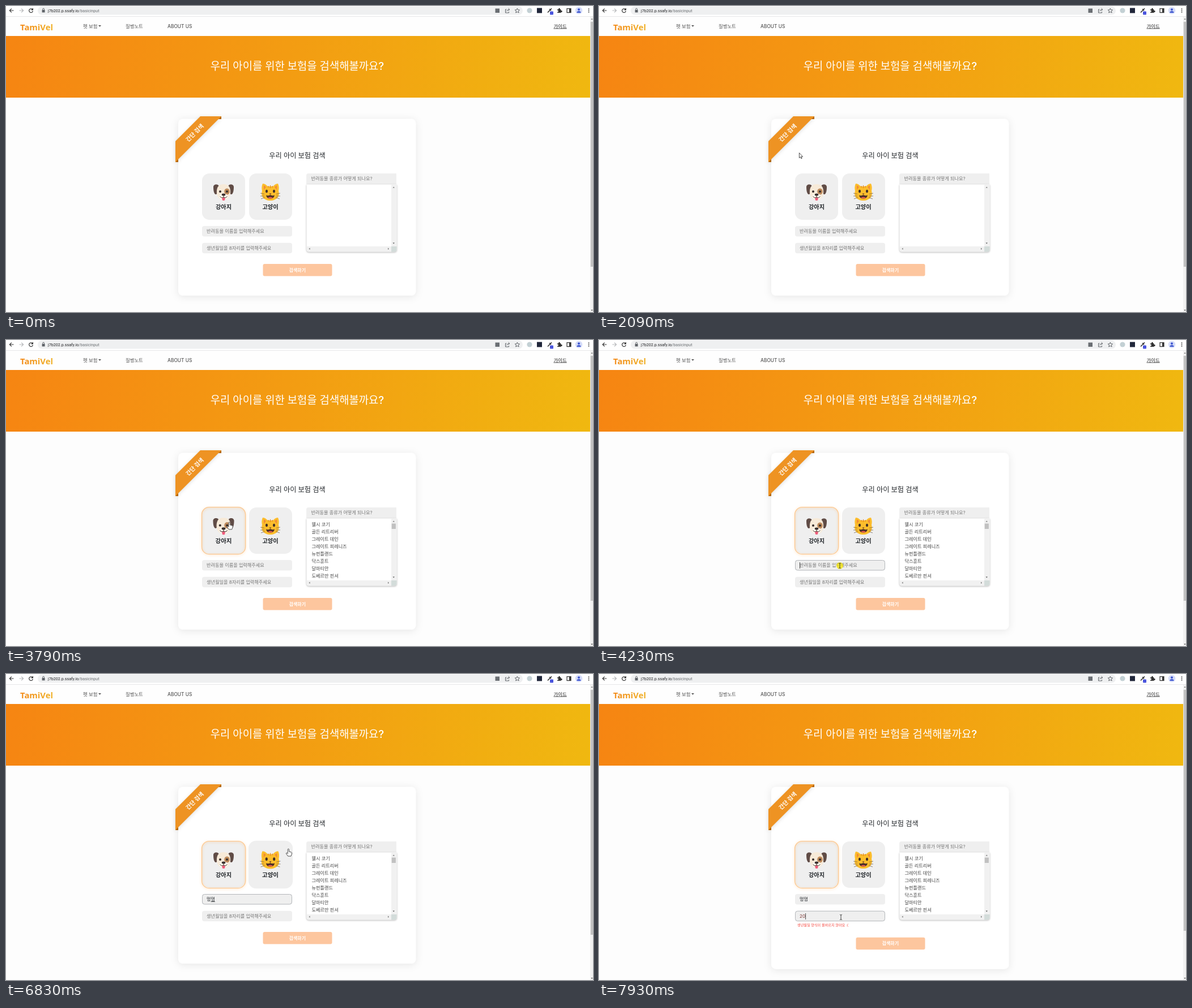
An HTML page that plays this animation: 1036 px wide and 541 px high, repeating every 8 s.

```html
<!DOCTYPE html>
<html lang="ko">
<head>
<meta charset="utf-8">
<title>보험 검색</title>
<style>
html, body { margin: 0; width: 100%; height: 100%; overflow: hidden; background: #fdfdfd; }
svg { display: block; width: 100vw; height: 100vh; }
text { font: 8.15px Inter, "Noto Sans CJK KR", "Noto Sans CJK", sans-serif; fill: #212529; white-space: pre; }
.mid { text-anchor: middle; }
.url { font: 7.2px Roboto, sans-serif; fill: #202124; }
.nav { font-size: 8.4px; font-weight: 500; fill: #555; }
.logo { font: 700 14.8px "Noto Sans", sans-serif; fill: url(#logoFill); }
.hero { font-size: 18.8px; font-weight: 500; fill: #fff; }
.title { font-size: 12.2px; font-weight: 500; }
.label { font-size: 10.2px; font-weight: 700; }
.ribbon { font-size: 10px; font-weight: 700; fill: #fff; }
.hint { fill: #757575; }
.button { font-size: 8px; font-weight: 700; fill: #fff; }
.error { font-size: 6.15px; fill: #f5453d; }
.panel { fill: #fff; filter: drop-shadow(0 2px 7px rgba(0, 0, 0, .09)); }
.listbox { fill: #fff; filter: drop-shadow(0 1.5px 1.5px rgba(0, 0, 0, .32)); }
.field, .pet { fill: #efefef; }
.ring { fill: none; stroke: #fdc88f; stroke-width: 1.3; filter: drop-shadow(0 1px 2px rgba(253, 175, 90, .55)); }
.focus { fill: none; stroke: #b4b7bb; }
.icon { fill: none; stroke: #5f6368; stroke-width: 1; }
.scale { transform-box: fill-box; transform-origin: center; }
</style>
</head>
<body>
<svg viewBox="0 0 1036 541" preserveAspectRatio="none">
  <defs>
    <linearGradient id="heroFill" gradientUnits="userSpaceOnUse" x1="0" y1="53" x2="1031" y2="162">
      <stop offset="0" stop-color="#f68512"/><stop offset=".5" stop-color="#f39d12"/><stop offset="1" stop-color="#f0b810"/>
    </linearGradient>
    <linearGradient id="logoFill"><stop stop-color="#f38a17"/><stop offset="1" stop-color="#f0b22a"/></linearGradient>
  </defs>
  <rect width="1036" height="541" fill="#fdfdfd"/>

  <!-- browser bar -->
  <rect width="1036" height="18" fill="#fff"/>
  <rect x="56" y="1" width="856" height="14.5" rx="7.2" fill="#eff0f1"/>
  <path d="M0 18.5H1036" stroke="#e6e7e8"/>
  <path class="icon" style="stroke:#333;stroke-width:1.2" d="M13.5 8H6.5M9.8 4.6L6.4 8l3.4 3.4"/>
  <path class="icon" style="stroke:#b5b7ba;stroke-width:1.2" d="M23.5 8h7M27.2 4.6L30.6 8l-3.4 3.4"/>
  <path class="icon" style="stroke:#333;stroke-width:1.2" d="M46.7 6A3.4 3.4 0 1 0 47.4 9M47.4 4v2.8h-2.8"/>
  <path d="M63.6 7h5v4.4h-5z" fill="#5f6368"/><path class="icon" d="M64.7 7V5.6a1.4 1.4 0 0 1 2.8 0V7"/>
  <text class="url" x="74" y="10.8">j7b202.p.ssafy.io<tspan fill="#6b6f73">/basicinput</tspan></text>
  <rect x="863.5" y="4.5" width="7.5" height="7.5" fill="#6a6e73"/>
  <path class="icon" d="M883.5 6H881.5V12H887.5V10M883.5 9.5q.5-3 5-3.2M886.5 4l2.3 2.2-2.3 2.2"/>
  <path class="icon" stroke-width=".9" d="M902.4 4l1.2 2.8 3 .2-2.3 2 .8 3-2.7-1.6-2.7 1.6.8-3-2.3-2 3-.2z"/>
  <circle cx="924" cy="8" r="4.6" fill="#c3d0d4"/>
  <rect x="937" y="3.5" width="9" height="9" fill="#20263a"/>
  <path d="M956 11.5l4.5-4.8M959 5.3l3 3M961 6.3l2-2" stroke="#333" stroke-width="1.6"/>
  <rect x="960" y="9.5" width="6" height="6" rx="1" fill="#4a55dd"/>
  <path d="M973 6h2.2a1.5 1.5 0 1 1 2.6 0h1.7v2.2a1.5 1.5 0 1 1 0 2.6V12H973v-1.6a1.4 1.4 0 1 0 0-2.6z" fill="#333"/>
  <rect x="990" y="4.6" width="7" height="7" fill="none" stroke="#333" stroke-width="1.2"/><path d="M994 4.6h3v7h-3z" fill="#333"/>
  <circle cx="1011" cy="8" r="6.3" fill="#d5dcf8"/><circle cx="1011" cy="6.2" r="2" fill="#3f57cf"/><path d="M1007.4 12q0-3 3.6-3t3.6 3z" fill="#3f57cf"/>
  <path d="M1028.500 4.500v7" stroke="#333" stroke-width="1.7" stroke-dasharray="1.6 1.1"/>

  <!-- navigation and hero -->
  <rect y="19" width="1031" height="34" fill="#fefefe"/>
  <text class="logo" x="25" y="42.700">TamiVel</text>
  <text class="nav" x="136" y="38.500">펫 보험</text><path d="M163 34h5l-2.500 2.800z" fill="#555"/>
  <text class="nav" x="211" y="38.500">질병노트</text>
  <text class="nav" x="285" y="38.500">ABOUT US</text>
  <text class="nav" x="966.500" y="38.500" style="fill:#222;text-decoration:underline">가이드</text>
  <rect y="53" width="1031" height="109" fill="url(#heroFill)"/>
  <text class="hero mid" x="514" y="113.300">우리 아이를 위한 보험을 검색해볼까요?</text>
  <rect x="1031" y="19" width="5" height="522" fill="#f1f1f1"/>
  <path d="M1032.300 24l1.700-2 1.700 2z" fill="#777"/><path d="M1032.300 537l1.700 2 1.700-2z" fill="#555"/>
  <rect id="thumb" x="1031.800" y="28" width="4.200" height="433" fill="#c1c1c1"/>

  <!-- search panel -->
  <rect id="panel" class="panel" x="304" y="199.500" width="419.500" height="312.500" rx="8"/>
  <path d="M375 195h5v5h-5zM299 271h5v5h-5z" fill="#b9690f"/>
  <path d="M343 195h37L299 276V239z" fill="#ee9323" style="filter:drop-shadow(0 2px 3px rgba(0,0,0,.12))"/>
  <text class="ribbon mid" transform="translate(333 224) rotate(-45)" y="3.700">간단 검색</text>
  <text class="title mid" x="514" y="268.600">우리 아이 보험 검색</text>

  <g id="dog" class="scale">
    <rect class="pet" x="346" y="296" width="76" height="82" rx="13"/>
    <path d="M375 317c-4-3-9-1-9 3 0 6 1 12 4 13 4 0 5-8 7-12zM393 317c4-3 9-1 9 3 0 6-1 12-4 13-4 0-5-8-7-12z" fill="#604c46"/>
    <path d="M384 315c8 0 11 4 12 11 1 10-4 17-12 17s-13-7-12-17c1-7 4-11 12-11z" fill="#f7ead8"/>
    <ellipse cx="390" cy="328" rx="4.800" ry="5.600" fill="#bd8a5c"/>
    <ellipse cx="384" cy="337" rx="8" ry="5.400" fill="#fff8ee"/>
    <circle cx="378" cy="328" r="2" fill="#362d2b"/><circle cx="390" cy="328" r="2" fill="#362d2b"/>
    <path d="M381.500 338.500h5v3a2.500 2.500 0 0 1-5 0z" fill="#ef5d7c"/>
    <path d="M377.500 336.500q3 4 6.500 1.500 3.500 2.500 6.500-1.500M384 335v3" fill="none" stroke="#44372f"/>
    <ellipse cx="384" cy="333.500" rx="3.300" ry="2.100" fill="#362d2b"/>
    <text class="label mid" x="384" y="358.600">강아지</text>
  </g>
  <rect id="ring" class="ring" x="345.600" y="295.700" width="77" height="83" rx="13"/>
  <g id="cat" class="scale">
    <rect class="pet" x="429" y="296" width="76" height="82" rx="13"/>
    <path d="M453 314c4 0 7 3 9 5h9c2-2 5-5 9-5 2 4 2 9 1 13 3 9-3 17-14.500 17S449 336 452 327c-1-4-1-9 1-13z" fill="#fcbd2c"/>
    <path d="M455 317l4 3-4 5zM478 317l-4 3 4 5z" fill="#f08a38"/>
    <path d="M466.500 317v5M463 318v3M470 318v3" stroke="#df841f" stroke-width="1.200"/>
    <ellipse cx="460" cy="327.500" rx="2" ry="2.800" fill="#40302a"/><ellipse cx="473" cy="327.500" rx="2" ry="2.800" fill="#40302a"/>
    <path d="M459 334.500q4 1.500 7.500-.5 3.500 2 7.500.5-1 6-7.500 6t-7.500-6z" fill="#4d3027"/>
    <path d="M462 339q4.500-2.500 9 0-4 2.500-9 0z" fill="#ee5b52"/>
    <path d="M464.500 331.500h4l-2 2z" fill="#5a3325"/>
    <path d="M449 331l7 1.500M449 336h7M450 341l7-2.500M484 331l-7 1.500M484 336h-7M483 341l-7-2.500" stroke="#685849" stroke-width=".7"/>
    <text class="label mid" x="466.500" y="358.600">고양이</text>
  </g>

  <g id="name">
    <rect class="field" x="346" y="389" width="159" height="18.500" rx="4"/>
    <rect class="focus" x="346.500" y="389.500" width="158" height="17.500" rx="4"/>
    <text class="hint" x="354" y="401.200">반려동물 이름을 입력해주세요</text>
    <text class="value" x="354" y="401.200"></text>
    <path class="caret" d="M.500 393v11" stroke="#222" stroke-width=".8"/>
  </g>
  <g id="birth">
    <rect class="field" x="346" y="418.700" width="159" height="18.500" rx="4"/>
    <rect class="focus" x="346.500" y="419.200" width="158" height="17.500" rx="4"/>
    <text class="hint" x="354" y="431.200">생년월일을 8자리를 입력해주세요</text>
    <text class="value" x="354" y="431.200" style="fill:#803a36"></text>
    <path class="caret" d="M.500 423v11" stroke="#222" stroke-width=".8"/>
  </g>
  <text id="error" class="error" x="350" y="446.300">생년월일 양식이 올바르지 않아요 :(</text>

  <path d="M530 315.500V300q0-4 4-4H689V315.500z" fill="#efefef"/>
  <text class="hint" x="538.500" y="308.300">반려동물 종류가 어떻게 되나요?</text>
  <path class="listbox" d="M530.500 315.500H689.500V430q0 4.500-4.500 4.500H535q-4.500 0-4.500-4.500z"/>
  <path d="M680 315.500h9.500V425H680zM531 425h149v9.500H535q-4 0-4-4.500z" fill="#f1f1f1"/>
  <path d="M680 425h9.500v5q0 4.500-4.500 4.500h-5z" fill="#d3dcda"/>
  <path d="M682.500 321.500l1.700-2 1.700 2zM536.500 427.500v3.500l-2-1.750zM674 427.500v3.500l2-1.750z" fill="#777"/>
  <path d="M682.500 418.500l1.700 2 1.700-2z" fill="#555"/>
  <g id="breeds"><rect x="680.700" y="324.500" width="7.200" height="9.500" fill="#c1c1c1"/></g>

  <g id="submit">
    <rect x="453.500" y="456" width="122" height="21.500" rx="3" fill="#fdc69e"/>
    <text class="button mid" x="514.300" y="469.500">검색하기</text>
  </g>

  <g id="pointer">
    <circle id="click" r="6" fill="#f5e600" opacity=".75"/>
    <path id="arrow" d="M.500.500V9.500L2.600 7.700 4 10.700 5.300 10.100 4 7.200H6.700z" fill="#fff" stroke="#222" stroke-width=".8"/>
    <path id="hand" d="M-1.200 7V1.300a1.100 1.100 0 0 1 2.300 0V5l4 1q1.200.5 1 1.900L5.500 10.500 4.500 13H-.800L-3.700 9q-.8-1.400.3-1.800 1-.3 2.200 1.400z" fill="#fff" stroke="#222" stroke-width=".8"/>
    <path id="beam" d="M-2-4.500q2 0 2 1.200 0-1.200 2-1.200M0-3.500v7M-2 4.500q2 0 2-1.200 0 1.200 2 1.200" fill="none" stroke="#333" stroke-width=".9"/>
  </g>
</svg>
<script>
const LOOP = 8000;
const $ = id => document.getElementById(id);
const show = (el, on) => { el.style.visibility = on ? 'visible' : 'hidden'; };
const within = (t, from, to) => t >= from && t < to;
const ramp = (t, from, length) => {
  const u = Math.min(1, Math.max(0, (t - from) / length));
  return u * u * (3 - 2 * u);
};
const latest = (steps, t) => steps.filter(([at]) => t >= at).pop()[1];

// time, x, y, optional ease-out power of the move that ends here
const path = [
  [340, 1010, 531], [730, 473, 242, 2], [1020, 473, 242], [1130, 465, 235],
  [1390, 465, 235], [1400, 462, 233], [1510, 449, 229], [1660, 449, 229],
  [1800, 422, 199], [2080, 352, 255], [2300, 370, 338], [2460, 376, 336],
  [2750, 394, 321.5, 2], [3790, 394, 321.5], [4190, 425, 399, 2], [4610, 425, 399],
  [5120, 498, 308.5, 2], [6830, 498, 308.5], [6910, 533, 352], [7020, 479, 401],
  [7270, 427, 430, 2], [LOOP, 427, 430]
];
const clicks = [[3190, 3270], [4200, 4290], [7290, 7380]];
const nameSteps = [[0, ''], [5650, 'd'], [5780, ''], [6010, 'ㅁ'], [6100, '머'],
  [6190, '멍'], [6280, '멍ㅁ'], [6370, '멍머'], [6450, '멍멍']];
const birthSteps = [[0, ''], [7770, '2'], [7930, '20']];
const nameFocus = 4200, birthFocus = 7290, composing = 6010, invalid = 7770;

['웰시 코기', '골든 리트리버', '그레이트 데인', '그레이트 피레니즈', '뉴펀틀랜드', '닥스훈트', '달마티안', '도베르만 핀셔']
  .forEach((breed, i) => {
    const row = document.createElementNS('http://www.w3.org/2000/svg', 'text');
    row.setAttribute('x', 539.5);
    row.setAttribute('y', 329 + i * 13.05);
    row.style.fill = '#444';
    row.textContent = breed;
    $('breeds').append(row);
  });

function position(t) {
  const i = Math.max(1, path.findIndex(p => p[0] > t));
  const [t0, x0, y0] = path[i - 1], [t1, x1, y1, power = 1] = path[i];
  const u = 1 - (1 - Math.max(0, (t - t0) / (t1 - t0))) ** power;
  return [x0 + (x1 - x0) * u, y0 + (y1 - y0) * u];
}

function drawPointer(t) {
  const [x, y] = position(t), on = t >= path[0][0];
  const hand = within(y, 296, 378) && (within(x, 346, 422) || within(x, 429, 505));
  const beam = within(x, 346, 505) && (within(y, 389, 408) || within(y, 419, 438));
  $('pointer').setAttribute('transform', `translate(${x} ${y})`);
  show($('hand'), on && hand);
  show($('beam'), on && beam);
  show($('arrow'), on && !hand && !beam);
  show($('click'), clicks.some(([from, to]) => within(t, from, to)));
}

function drawField(id, text, focused, caret, underline) {
  const part = name => $(id).querySelector('.' + name);
  const value = part('value');
  value.textContent = text;
  if (underline) {
    value.textContent = text.slice(0, -1);
    const last = document.createElementNS(value.namespaceURI, 'tspan');
    last.style.textDecoration = 'underline';
    last.textContent = text.slice(-1);
    value.append(last);
  }
  show(part('hint'), !text);
  show(part('focus'), focused);
  show(part('caret'), caret);
  const end = 354 + (text ? value.getComputedTextLength() : 0);
  part('caret').setAttribute('transform', `translate(${end} 0)`);
}

function hover(id, t, from, to) {
  const amount = ramp(t, from, 200) - ramp(t, to, 200);
  $(id).style.transform = `scale(${1 + .03 * amount})`;
}

function render(t) {
  hover('dog', t, 2420, 3860);
  hover('cat', t, 4880, 6850);
  show($('ring'), t >= 3190);
  show($('breeds'), t >= 3790);

  const name = latest(nameSteps, t);
  drawField('name', name, within(t, nameFocus, birthFocus), within(t, nameFocus, nameFocus + 500),
    name && within(t, composing, birthFocus));
  drawField('birth', latest(birthSteps, t), t >= birthFocus, t >= birthFocus, false);

  const wrong = t >= invalid;
  show($('error'), wrong);
  $('submit').setAttribute('transform', `translate(0 ${wrong ? 9.7 : 0})`);
  $('panel').setAttribute('height', wrong ? 322.2 : 312.5);
  $('thumb').setAttribute('height', wrong ? 426 : 433);
  drawPointer(t);
}

const start = performance.now();
function tick() {
  render((performance.now() - start) % LOOP);
  requestAnimationFrame(tick);
}
tick();
</script>
</body>
</html>
```
